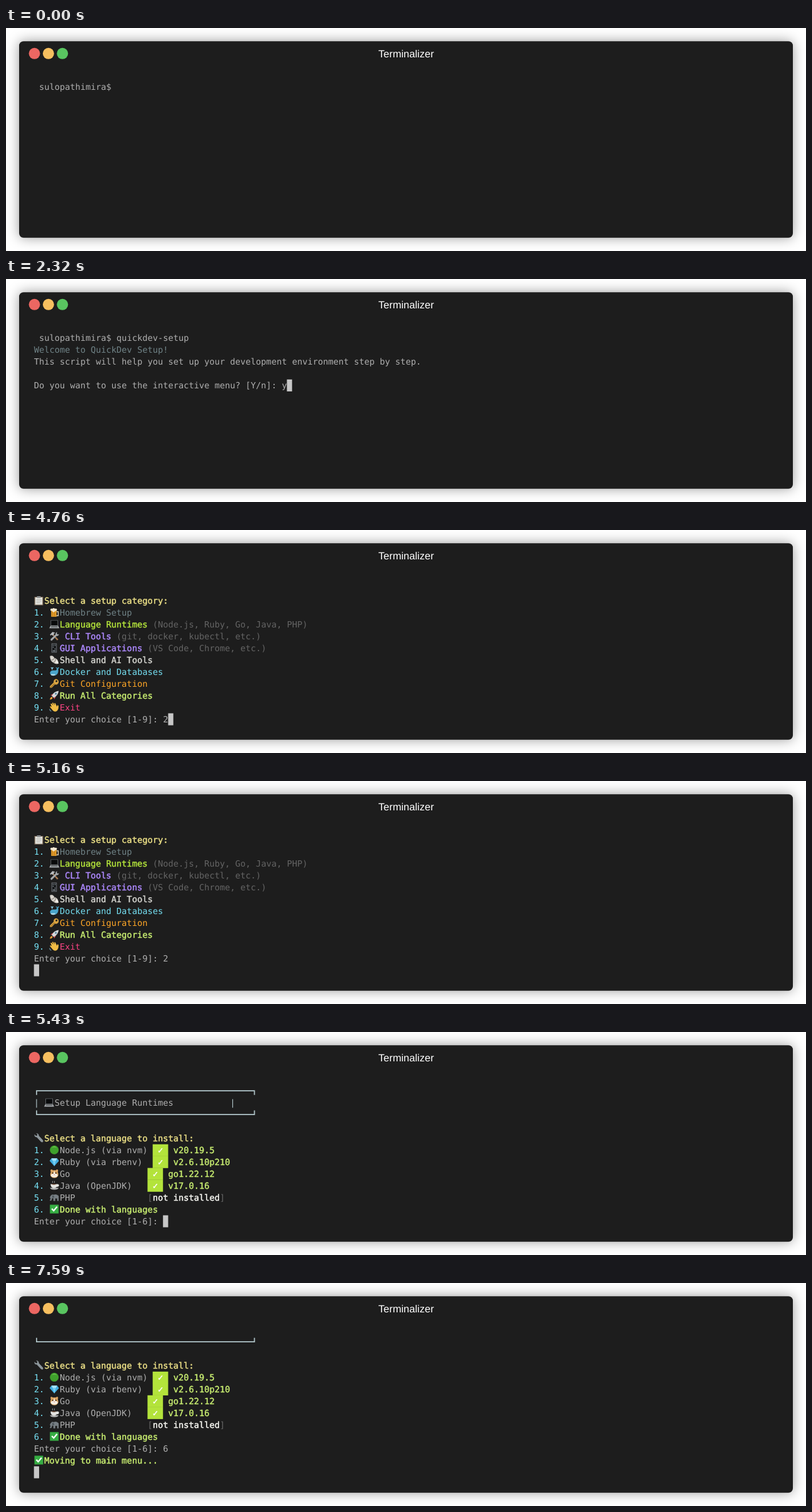
An HTML page with a canvas for the animation above (8000 ms loop, 1280 by 357 pixels).

```html
<!DOCTYPE html>
<html lang="en">
<head>
<meta charset="utf-8">
<title>Terminal session</title>
<style>
html, body { margin: 0; width: 100%; height: 100%; overflow: hidden; background: #fff; }
canvas { display: block; width: 1280px; height: 357px; }
</style>
</head>
<body>
<canvas id="stage"></canvas>
<script>
const W = 1280, H = 357, LOOP = 8000;
const CELL = 8.26, LINE = 18.95, LEFT = 44.7, TOP = 85;
const MONO = '13.72px "DejaVu Sans Mono", monospace';
const C = {
  fg: '#afafaf', dim: '#646464', cursor: '#c7c7c7', red: '#fc4384', green: '#b3e33b',
  yellow: '#ffa727', blue: '#75dff2', magenta: '#ae89fe', cyan: '#708387', white: '#d5d5d0',
  lime: '#c8ed71', cream: '#ebdf86', ice: '#b1c6ca', bright: '#f9f9f4'
};

const canvas = document.getElementById('stage');
const ctx = canvas.getContext('2d');
const dpr = window.devicePixelRatio || 1;
canvas.width = W * dpr;
canvas.height = H * dpr;
ctx.scale(dpr, dpr);

// Icons: [colour, path] layers on a 16-unit square
const ICONS = {
  clipboard: [['#85725f', 'M1 2h14v13.5h-14z'], ['#e4e4de', 'M2.3 3h11.4v11.5h-11.4z'],
    ['#8f9294', 'M5 1h6v3h-6z'], ['#b4b4b0', 'M4 6h8v1h-8zM4 8.5h8v1h-8zM4 11h6v1h-6z']],
  beer: [['#d5cbb5', 'M11 6h4v8h-4v-1.5h2.5v-5h-2.5z'], ['#e6a02c', 'M3 4h8.5v11h-8.5z'],
    ['#b97518', 'M5 7h1v7h-1zM8 7h1v7h-1z'], ['#f4ead2', 'M2 5q-1-4 3-3q2-2 4 0q4-1 3 3l-3 1l-2 2l-2-2z']],
  laptop: [['#5c6064', 'M2 1.5h12v9h-12z'], ['#090a0b', 'M3 2.3h10v7.5h-10z'],
    ['#aeb2b5', 'M2 10.5h12l2 4h-16z'], ['#4b4f52', 'M3 11.3h10l.7 1.5h-11.4z']],
  tools: [['#a97950', 'M12.5 15l-7-8l1.5-1.5l7.5 8z'], ['#b9bcbe', 'M1 6l4-4.5l4 1l-1 1.5l-1-.2l.5 1.7l-2 2l-1.8-1.7l-1.2 1.5z'],
    ['#a4a8ab', 'M2 13l8-7.5q-.5-3 2.5-4l-.5 2.5l1.5 1.5l2-.8q-.5 3.5-4 3.3l-7.5 7.5q-2 .5-2-2.5z']],
  phone: [['#70757a', 'M3.5.8h8.5v14.7h-8.5z'], ['#17191b', 'M4.5 1.8h6.5v12.7h-6.5z'],
    ['#8f989e', 'M5.5 3h1.5v1.5h-1.5zM8.5 3h1.5v1.5h-1.5zM5.5 6h1.5v1.5h-1.5zM8.5 9h1.5v1.5h-1.5zM5.5 12h4.5v1.5h-4.5z']],
  shell: [['#d9d5ce', 'M1 2q5-2 7 3q6 1 7 9q-4 2-8-1q-6-3-6-11z'],
    ['#918b84', 'M3 8q3 0 5-3l1 .7q-2 3-5 3.5zM6 12q3-1 4-6l1 .6q-1 5-4 6.5z'], ['#f3f0eb', 'M10 12q2-4 3-2t1 4z']],
  whale: [['#4aa5cb', 'M1 10q1-4 5-4h4q2 0 2-3l-2-2q3 0 3.2 1.5q1-2 2.5-1q-1 2-1.7 2q1 5-1 8q-2 3-6 3q-5 0-6-4.5z'],
    ['#b9dce8', 'M2 12h8q-1 2.5-4 2.5q-3 0-4-2.5z'], ['#8ed4ef', 'M4 5q0-3-2-3q2-2 2.5 0q1-2 2.5 0q-2 0-2 3z']],
  key: [['#d9a441', 'M10.5 1a4.5 4.5 0 1 1-1.5 8.7l-5 5.3h-3v-2.5l6-6a4.5 4.5 0 0 1 3.5-5.5z'],
    ['#1d1d1d', 'M11.5 3a1.5 1.5 0 1 1-.1 0z'], ['#8e6420', 'M2 14l6-6l.7.7l-5.5 5.5z']],
  rocket: [['#c64949', 'M2 8l4-2.5l4.5 5l-2.5 4l-1.5-3.5l-1.5-1.5z'], ['#d5d8da', 'M4 9q3-7 11-8q-1 8-8 11z'],
    ['#5a87a0', 'M10.5 4a1.6 1.6 0 1 1-.1 0z'], ['#f0a035', 'M4 10.5l1.5 1.5q-1 3-4.5 3q0-3.5 3-4.5z']],
  hand: [['#f0bd45', 'M2 3l1.5-.8l3 3.3l-2-4l1.4-.7l3 4.4l-1-3.5l1.5-.3l3 6l.4-2.4q2-.4 2 1.5q0 6-3 8q-4 2-7-2l-4-5l1.2-1l2 1.5z'],
    ['#7399ad', 'M0 11q0 3 3 4l.5-.8q-2.3-1-2.5-3.2z']],
  wrench: [['#8e979c', 'M1 2l2.5 2.5l1.8-.5l.4-1.8l-2-1.7q4-.5 4.5 4l6.5 7q1 2-.5 3q-1.5.5-3-.9l-6.5-7q-4 .4-3.7-4.6z']],
  dot: [['#3fa02c', 'M8 1a7 7 0 1 1-.1 0z'], ['#62bd46', 'M8 2a5 5 0 0 1 4 3q-4-2-8 0a5 5 0 0 1 4-3z']],
  gem: [['#43aee0', 'M3.5 2.5h9l3 4l-7.5 8.5l-7.5-8.5z'], ['#a8e3fa', 'M3.5 2.5h9l-2 4h-5z'],
    ['#75cff3', 'M5.5 6.5h5l-2.5 8.5z']],
  hamster: [['#dca461', 'M2.5 1.5q2-.5 3 1h5q1-1.5 3-1q1.5 2 0 4q2 4 0 7q-2 2.5-5.5 2.5t-5.5-2.5q-2-3 0-7q-1.5-2 0-4z'],
    ['#f5eee2', 'M8 3l1.5 5q4 0 4 3q-1 3-5.5 3t-5.5-3q0-3 4-3z'],
    ['#39261b', 'M4.5 6h1.7v2h-1.7zM9.8 6h1.7v2h-1.7z'], ['#d66d76', 'M7 9h2l-1 1.5z']],
  coffee: [['#b8b9b9', 'M1 12h14q-1 3-7 3t-7-3z'], ['#e4e4e1', 'M2 6h10.5q3-.5 3 2t-3.7 2.5q-1.3 2-4.5 2q-5 0-5.3-6.5z'],
    ['#5d3a26', 'M3 6q4-1.5 8.5 0q-4 2-8.5 0z'], ['#999b9b', 'M5 4q-1-1 0-3h1q-1 2 0 3zM8 4q-1-1 0-3h1q-1 2 0 3z']],
  elephant: [['#767e83', 'M1 9q0-3 2-4q1-2 4-1q5-2 8 2v8h-2.5v-4h-3v4h-3v-4l-2-.5q-.5 5-3.5 4v-1.5q1 0 1-2z'],
    ['#4f575c', 'M5 5q3 0 3 3q-2 2-3.5 0z']],
  check: [['#36ad43', 'M1 1h14v14h-14z'], ['#fff', 'M3.2 8.2l1.6-1.6l2.2 2.3l4.5-5.4l1.8 1.3l-6.2 7.4z']]
};
for (const layers of Object.values(ICONS))
  for (const layer of layers) layer[1] = new Path2D(layer[1]);

// Items of a line, each placed at a column
const text = (col, str, color = C.fg, bold = false) => (x, y) => {
  ctx.font = MONO;
  ctx.fillStyle = ctx.strokeStyle = color;
  ctx.fillText(str, x + col * CELL, y + 14.2);
  if (bold) {
    ctx.lineWidth = 0.45;
    ctx.strokeText(str, x + col * CELL, y + 14.2);
  }
};
const icon = (col, name) => (x, y) => {
  ctx.save();
  ctx.translate(x + col * CELL - 0.2, y + 1);
  for (const [color, path] of ICONS[name]) {
    ctx.fillStyle = color;
    ctx.fill(path);
  }
  ctx.restore();
};
const fill = (col, cells, color) => (x, y) => {
  ctx.fillStyle = color;
  ctx.fillRect(x + col * CELL, y, cells * CELL, LINE + 0.2);
};
const rule = dir => (x, y) => {
  ctx.strokeStyle = C.ice;
  ctx.lineWidth = 1.7;
  ctx.beginPath();
  ctx.moveTo(48.9, y + 9.2 + 6.5 * dir);
  ctx.lineTo(48.9, y + 9.2);
  ctx.lineTo(397.5, y + 9.2);
  ctx.lineTo(397.5, y + 9.2 + 6.5 * dir);
  ctx.stroke();
};
const option = (n, name, ...rest) => [text(0, n + '.', C.blue), icon(3, name), ...rest];
const installed = (col, version) =>
  [fill(col, 3, C.green), text(col + 1, '✓', '#fff', true), text(col + 4, version, C.lime, true)];

const prompt = text(1, 'sulopathimira$');
const command = [prompt, text(16, 'quickdev-setup')];
const question = text(0, 'Do you want to use the interactive menu? [Y/n]:');
const welcome = [
  command,
  [text(0, 'Welcome to QuickDev Setup!', C.cyan)],
  [text(0, 'This script will help you set up your development environment step by step.')],
  []
];
const menu = [
  [],
  [icon(0, 'clipboard'), text(2, 'Select a setup category:', C.cream, true)],
  option(1, 'beer', text(5, 'Homebrew Setup', C.cyan)),
  option(2, 'laptop', text(5, 'Language Runtimes', C.green, true), text(23, '(Node.js, Ruby, Go, Java, PHP)', C.dim)),
  option(3, 'tools', text(6, 'CLI Tools', C.magenta, true), text(16, '(git, docker, kubectl, etc.)', C.dim)),
  option(4, 'phone', text(5, 'GUI Applications', C.magenta, true), text(22, '(VS Code, Chrome, etc.)', C.dim)),
  option(5, 'shell', text(5, 'Shell and AI Tools', C.white, true)),
  option(6, 'whale', text(5, 'Docker and Databases', C.blue)),
  option(7, 'key', text(5, 'Git Configuration', C.yellow)),
  option(8, 'rocket', text(5, 'Run All Categories', C.lime, true)),
  option(9, 'hand', text(5, 'Exit', C.red))
];
const header = [
  [rule(1)],
  [text(0, '|', C.ice), icon(2, 'laptop'), text(4, 'Setup Language Runtimes'), text(38, '|', C.ice)],
  [rule(-1)]
];
const languages = [
  ...header,
  [],
  [icon(0, 'wrench'), text(2, 'Select a language to install:', C.cream, true)],
  option(1, 'dot', text(5, 'Node.js (via nvm)'), ...installed(23, 'v20.19.5')),
  option(2, 'gem', text(5, 'Ruby (via rbenv)'), ...installed(23, 'v2.6.10p210')),
  option(3, 'hamster', text(5, 'Go'), ...installed(22, 'go1.22.12')),
  option(4, 'coffee', text(5, 'Java (OpenJDK)'), ...installed(22, 'v17.0.16')),
  option(5, 'elephant', text(5, 'PHP'), text(22, '[', C.dim),
    text(23, 'not installed', C.bright, true), text(36, ']', C.dim)),
  option(6, 'check', text(5, 'Done with languages', C.lime, true))
];
const choice = (max, answer = '') => [text(0, `Enter your choice [1-${max}]: ${answer}`)];
const moving = [icon(0, 'check'), text(2, 'Moving to main menu...', C.lime, true)];

// [start ms, lines, cursor column, cursor row]
const STEPS = [
  [0, [[prompt]]],
  [500, [command], 30, 0],
  [840, [command], 0, 1],
  [940, [...welcome, [question]], 48, 4],
  [2320, [...welcome, [question, text(48, 'y')]], 49, 4],
  [2660, [...welcome, [question, text(48, 'y')]], 0, 5],
  [2760, [...menu, choice(9)], 25, 11],
  [4760, [...menu, choice(9, '2')], 26, 11],
  [5160, [...menu.slice(1), choice(9, '2')], 0, 11],
  [5260, [[], ...header], 0, 4],
  [5430, [...languages, choice(6)], 25, 11],
  [7170, [...languages, choice(6, '6')], 26, 11],
  [7590, [...languages.slice(2), choice(6, '6'), moving], 0, 11]
];

function drawWindow() {
  ctx.fillStyle = '#fff';
  ctx.fillRect(0, 0, W, H);
  ctx.save();
  ctx.shadowColor = 'rgba(0, 0, 0, 0.4)';
  ctx.shadowBlur = 20 * dpr;
  ctx.fillStyle = '#1d1d1d';
  ctx.beginPath();
  ctx.roundRect(21, 21.3, 1238, 314.5, 7);
  ctx.fill();
  ctx.restore();

  ['#ec6762', '#f6bf5f', '#59c560'].forEach((color, i) => {
    ctx.fillStyle = color;
    ctx.beginPath();
    ctx.arc(45.5 + i * 22.4, 40.8, 9, 0, Math.PI * 2);
    ctx.fill();
  });
  ctx.font = '16.5px "Liberation Sans", Arial, sans-serif';
  ctx.fillStyle = '#fff';
  ctx.textAlign = 'center';
  ctx.fillText('Terminalizer', 640.2, 46.7);
  ctx.textAlign = 'left';
}

function draw(time) {
  const [, lines, col, row] = STEPS.findLast(step => step[0] <= time);
  drawWindow();
  lines.forEach((line, i) => line.forEach(item => item(LEFT, TOP + i * LINE)));
  if (row !== undefined) fill(col, 1, C.cursor)(LEFT, TOP + row * LINE);
}

ctx.textRendering = 'geometricPrecision';
const start = performance.now();
function tick() {
  draw((performance.now() - start) % LOOP);
  requestAnimationFrame(tick);
}
tick();
</script>
</body>
</html>
```
